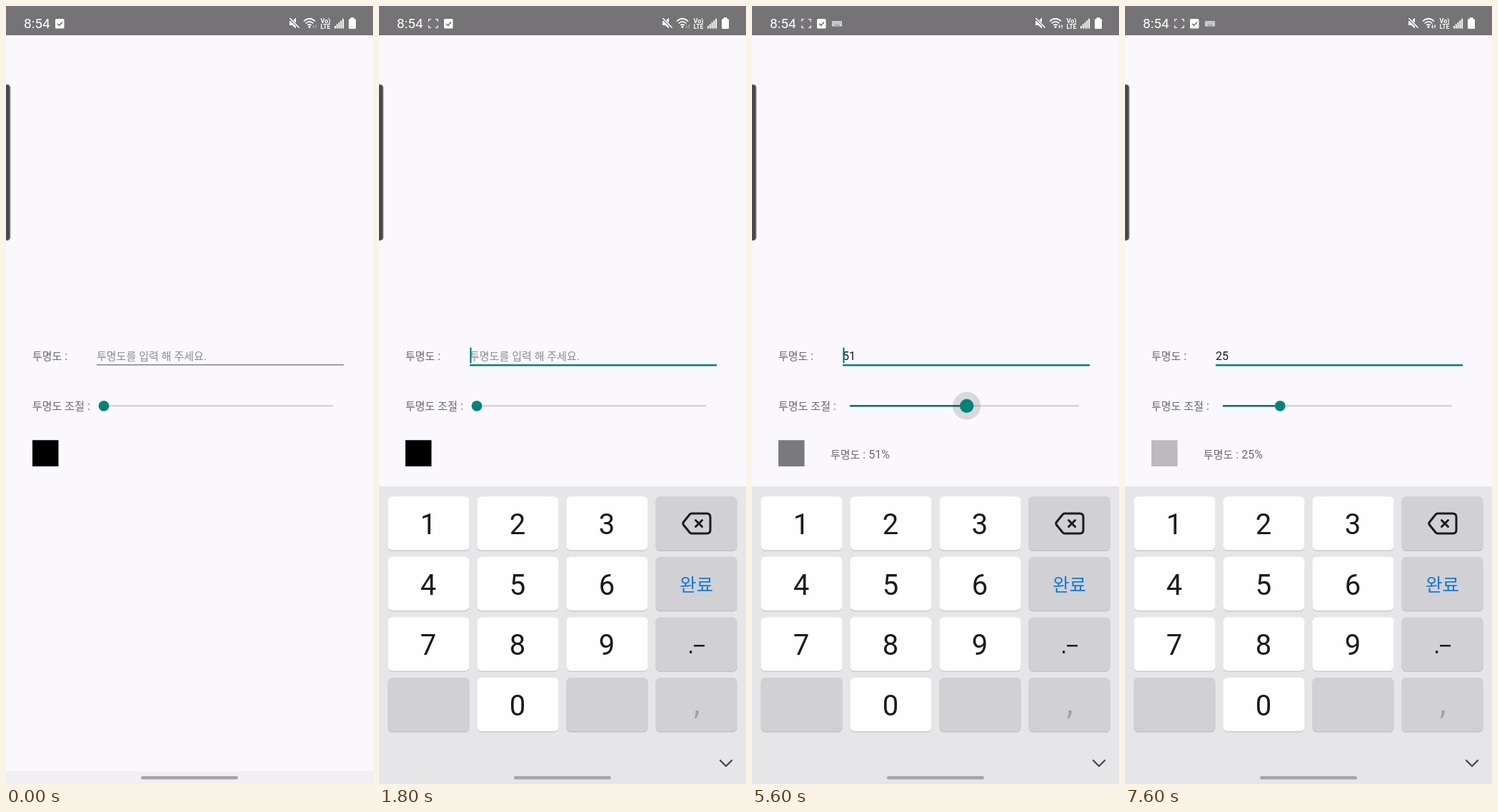
Recreate the animation shown at these times as an HTML page with a canvas. Size 514 by 1090 pixels, loop 8 s.

```html
<!DOCTYPE html>
<html lang="ko">
<head>
<meta charset="utf-8">
<style>
html, body { margin: 0; width: 100%; height: 100%; overflow: hidden; background: #faf8fc; }
canvas { display: block; }
</style>
</head>
<body>
<canvas id="stage" width="514" height="1090"></canvas>
<script>
const ctx = document.getElementById('stage').getContext('2d');
const LOOP = 8000, STEP = 100;
const BG = '#faf8fc', BAR = '#757376', TEAL = '#008577', GREY = '#6b696d', INK = '#1b1a1d';
const DRAG = [[5100, 25], [5200, 29], [5600, 51], [5800, 64], [6000, 70], [6300, 64],
              [6600, 46], [6800, 31], [6900, 28], [7100, 25]];

const clamp = x => Math.max(0, Math.min(1, x));
const ramp = (t, from, to) => clamp((t - from) / (to - from));

function rect(x, y, w, h, color, radius = 0) {
  ctx.fillStyle = color;
  ctx.beginPath();
  ctx.roundRect(x, y, w, h, radius);
  ctx.fill();
}

function disc(x, y, r, color) {
  ctx.fillStyle = color;
  ctx.beginPath();
  ctx.arc(x, y, r, 0, 7);
  ctx.fill();
}

function stroke(path, color, width) {
  ctx.strokeStyle = color;
  ctx.lineWidth = width;
  ctx.stroke(new Path2D(path));
}

function fill(path, color) {
  ctx.fillStyle = color;
  ctx.fill(new Path2D(path));
}

function text(str, x, y, color, font, align = 'left') {
  ctx.font = font;
  ctx.fillStyle = color;
  ctx.textAlign = align;
  ctx.fillText(str, x, y);
  return ctx.measureText(str).width;
}

// Hangul and Latin runs use different fonts and sizes.
function label(str, x, y, color) {
  for (const run of str.match(/[가-힣]+|[^가-힣]+/g)) {
    const font = /[가-힣]/.test(run) ? '15px "Noto Sans CJK KR", sans-serif' : '16px Roboto, sans-serif';
    x += text(run, x, y, color, font);
  }
  return x;
}

function at(x, y, alpha, draw) {
  ctx.save();
  ctx.translate(x, y);
  ctx.globalAlpha = alpha;
  draw();
  ctx.restore();
}

function statusBar(t) {
  rect(0, 0, 514, 41, BAR);
  text('8:54', 25, 31, '#fff', '19px Roboto, sans-serif');

  const shown = ramp(t, 0, 300);
  at(69, 18, shown, () => {
    stroke('M.7 4V.7H4M10 .7h3.3V4M13.3 9v3.3H10M4 12.3H.7V9', '#eee', 1.3);
    if (Math.floor((t - 100) / 500) % 2 === 0) {
      stroke('M3.2 4h5v5h-5z', '#eee', 1.2);
      fill('M8.5 6.5L11.2 4.3v4.5z', '#eee');
    }
  });
  at(69 + 22 * shown, 18, 1, () => {
    rect(0, 0, 12.5, 13.5, '#fff', 1.5);
    stroke('M3 6.8l2.6 2.6L9.9 4.6', BAR, 1.6);
  });
  at(112, 21, ramp(t, 1900, 2200), () => {
    rect(0, 0, 14, 7.5, '#d8d7d9', 1);
    for (let i = 0; i < 5; i++)
      for (let j = 0; j < 2; j++) rect(1.4 + i * 2.5, 1.3 + j * 2.1, 1.1, 1, BAR);
    rect(3.5, 5.5, 7, 1, BAR);
  });

  fill('M397 21h4l5-4.5v15l-5-4.500h-4z', '#fff');
  stroke('M397 17l14 14', BAR, 3.4);
  stroke('M397.500 17l13 13.500', '#fff', 1.6);
  stroke('M417 21.500q8-7.500 16 0M419.700 24.300q5.300-4.700 10.600 0M422.400 27q2.600-2.100 5.200 0', '#fff', 1.7);
  disc(425, 29.3, 1.5, '#fff');
  at(429, 26, t < 2000 ? .4 : 1, () => {
    fill('M0 3h1V0h1v3h1L1.500 5.500zM3.500 2.500L5 0l1.500 2.500h-1v3h-1v-3z', '#fff');
  });
  text('Vo)', 447.5, 23.5, '#fff', 'bold 9px Roboto, sans-serif', 'center');
  text('LTE', 447.5, 31.5, '#fff', 'bold 8.5px Roboto, sans-serif', 'center');
  for (let i = 0; i < 5; i++) rect(460 + i * 2.8, 28 - i * 2.6, 1.9, 3.5 + i * 2.6, '#fff');
  rect(482.500, 16, 5, 4, '#fff', 1);
  rect(480, 18, 10, 14, '#fff', 1.5);
}

function sliderValue(t) {
  if (t < 2800) return 0;
  if (t < 3300) return 2;
  if (t < 5100) return 25;
  const i = DRAG.findIndex(p => p[0] > t);
  if (i < 0) return 25;
  const [t0, v0] = DRAG[i - 1], [t1, v1] = DRAG[i];
  return Math.round(v0 + (v1 - v0) * ramp(t, t0, t1));
}

function form(t) {
  const value = sliderValue(t), typed = t >= 2800, focused = t >= 1400;

  label('투명도 :', 37, 496, GREY);
  let caret = 127;
  if (typed) {
    const end = label(String(value), 127, 496, INK);
    if (t < 5200) caret = end;
  } else {
    label('투명도를 입력 해 주세요.', 127, 495.5, '#8d8b8f');
  }
  rect(127, 502, 346, focused ? 2.5 : 1.4, focused ? TEAL : '#858387');

  const blinkStart = t < 2800 ? 1500 : t < 5200 ? 3400 : 7100;
  if (focused && Math.floor(Math.max(0, t - blinkStart) / 500) % 2 === 0)
    rect(caret + .3, 478.5, 2.2, 22, TEAL);

  label('투명도 조절 :', 37, 566, GREY);
  const x = 137 + value * 3.21;
  const press = ramp(t, 5000, 5200) * (1 - ramp(t, 7100, 7300));
  rect(137, 559.2, 321, 2, '#d0ced2');
  rect(137, 559, x - 137, 2.4, '#04746a');
  disc(x, 560.3, 19.5, `rgba(0,0,0,${.13 * press})`);
  disc(x, 560.3, 7.4 + 2.3 * press, TEAL);

  rect(37, 608.3, 36.5, 36.7, typed ? `rgba(0,0,0,${value / 100})` : '#000');
  if (typed) label(`투명도 : ${value}%`, 110, 633.5, GREY);
}

function keyboard(t) {
  if (t < 1400) return;
  const slide = (1 - ramp(t, 1400, 1800)) ** 2;
  at(0, 417 * slide, 1, () => {
    rect(0, 673, 514, 417, '#e6e5e8');
    [...'123<456완789. 0 ,'].forEach((key, i) => {
      const x = 12.5 + i % 4 * 125, y = 687.2 + Math.floor(i / 4) * 84.6;
      const digit = /\d/.test(key);
      rect(x, y + 1.7, 114, 75, digit ? '#cecdd0' : '#c5c4c7', 6);
      rect(x, y, 114, 75, digit ? '#fefdff' : '#d1d0d3', 6);
      if (digit) text(key, x + 56.5, y + 53, INK, '40px Roboto, sans-serif', 'center');
    });
    ctx.lineJoin = ctx.lineCap = 'round';
    stroke('M438 711H459Q464 711 464 716V734Q464 739 459 739H438Q436 739 435 737.500L426.500 727Q425 725 426.500 723L435 712.500Q436 711 438 711Z', INK, 3);
    stroke('M443.500 720.500l9 9m0-9l-9 9', INK, 3);
    text('완료', 444.5, 819.5, '#0a78e2', '25.5px "Noto Sans CJK KR", sans-serif', 'center');
    rect(435, 903.3, 3.2, 3.5, INK, .5);
    rect(441, 895, 15, 2.5, INK);
    fill('M443.500 987h4v4l-3 7h-2.500l1.500-7z', '#a09fa2');
    stroke('M478 1057l8 8 8-8', '#4b4a4d', 2.4);
  });
}

function draw(t) {
  rect(0, 0, 514, 1090, BG);
  statusBar(t);
  rect(-8, 109.5, 14.5, 219.5, '#a5a3a7', 5);
  rect(-8, 110.5, 13.3, 217.5, '#4a484c', 4);
  form(t);
  rect(0, 1072, 514, 18, '#f1eff2');
  keyboard(t);
  rect(189, 1079, 136, 4.600, '#a6a4a7', 2.3);
}

function tick(now) {
  draw(Math.floor(now % LOOP / STEP) * STEP);
  requestAnimationFrame(tick);
}
requestAnimationFrame(tick);
</script>
</body>
</html>
```
